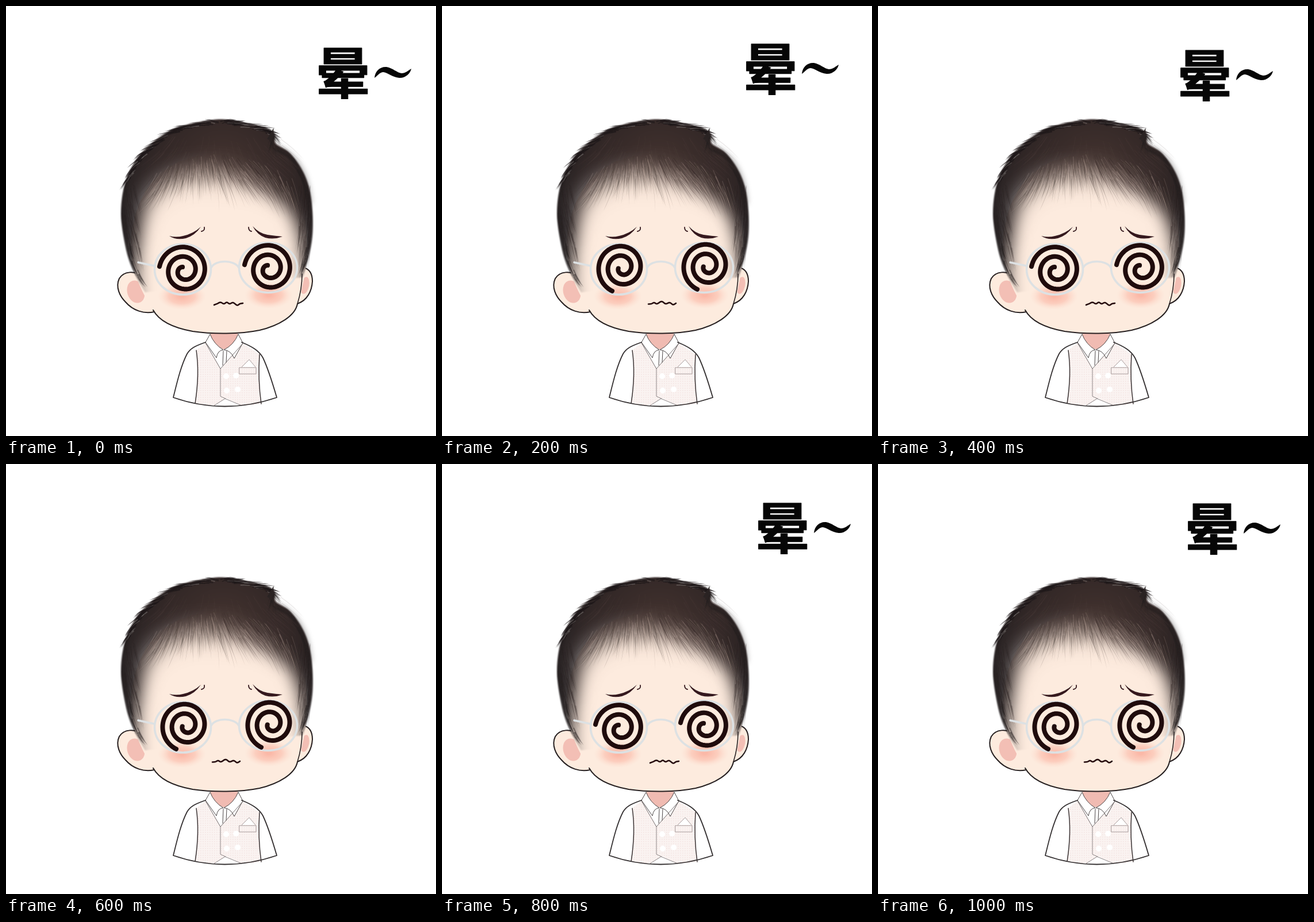
Write an HTML page with a canvas that moves like this. It is 748 by 748 pixels and loops after 1200 ms.

```html
<!DOCTYPE html>
<html lang="zh">
<head>
<meta charset="utf-8">
<title>晕~</title>
<style>
html, body { margin: 0; width: 100%; height: 100%; overflow: hidden; background: #fff; }
canvas { display: block; }
</style>
</head>
<body>
<canvas id="stage" width="748" height="748"></canvas>
<script>
const SIZE = 748, STEP = 200, INK = '#262021', SKIN = '#fdebde';
const ctx = document.getElementById('stage').getContext('2d');

let seed = 11;
const rnd = () => (seed = (seed * 16807) % 2147483647) / 2147483647;
const range = (a, b) => a + (b - a) * rnd();
const mix = (a, b, t) => a + (b - a) * Math.max(0, Math.min(1, t));

function layer() {
  const c = document.createElement('canvas');
  c.width = c.height = SIZE;
  return c.getContext('2d');
}

function fill(g, d, color) {
  g.fillStyle = color;
  g.fill(new Path2D(d));
}

function line(g, d, color, width) {
  g.strokeStyle = color;
  g.lineWidth = width;
  g.lineCap = g.lineJoin = 'round';
  g.stroke(new Path2D(d));
}

function oval(g, x, y, rx, ry, color, tilt = 0) {
  g.fillStyle = color;
  g.beginPath();
  g.ellipse(x, y, rx, ry, tilt, 0, 7);
  g.fill();
}

// Catmull-Rom curve sampled into [x, y] pairs
function spline(p, n = 14) {
  const out = [];
  for (let i = 0; i < p.length - 1; i++) {
    const a = p[Math.max(0, i - 1)], b = p[i], c = p[i + 1], d = p[Math.min(p.length - 1, i + 2)];
    for (let k = 0; k < n; k++) {
      const t = k / n;
      out.push([0, 1].map(j => b[j] + 0.5 * t * (c[j] - a[j] +
        t * (2 * a[j] - 5 * b[j] + 4 * c[j] - d[j] + t * (3 * (b[j] - c[j]) + d[j] - a[j])))));
    }
  }
  out.push(p[p.length - 1]);
  return out;
}

const toPath = pts => 'M' + pts.map(p => p.join(' ')).join('L');

// One tapered hair
function strand(g, x, y, angle, len, bend, width, color) {
  const mx = x + Math.cos(angle) * len / 2, my = y + Math.sin(angle) * len / 2;
  const ex = mx + Math.cos(angle + bend) * len / 2, ey = my + Math.sin(angle + bend) * len / 2;
  const nx = -Math.sin(angle) * width / 2, ny = Math.cos(angle) * width / 2;
  g.fillStyle = color;
  g.beginPath();
  g.moveTo(x - nx, y - ny);
  g.quadraticCurveTo(mx - nx, my - ny, ex, ey);
  g.quadraticCurveTo(mx + nx, my + ny, x + nx, y + ny);
  g.fill();
}

function drawBody(g) {
  const torso = 'M347 585C330 591 321 595 315 605C304 626 297 657 291 681Q380 712 471 681' +
    'C464 657 456 631 447 612C440 599 427 592 410 585';
  fill(g, torso + 'L378 600Z', '#fff');

  const vest = new Path2D('M331 599L347 586L373 631L412 587L441 606Q438 650 444 692Q386 700 329 691Q336 645 331 599Z');
  g.save();
  g.clip(vest);
  g.fillStyle = '#faf3f1';
  g.fillRect(280, 570, 200, 140);
  g.fillStyle = '#f4e5e3';
  for (let y = 584; y < 700; y += 4)
    for (let x = 326; x < 448; x += 4) g.fillRect(x, y, 1.6, 1.6);
  g.restore();

  fill(g, 'M362 695L382 682L411 695Z', '#fff');
  line(g, 'M362 695L381 683L410 695M373 631L373 679L382 683', '#8d8586', 1);
  for (const [x, y] of [[383, 644], [400, 643], [384, 669], [403, 667]]) oval(g, x, y, 5, 5, '#fff');
  fill(g, 'M410 628L423 615L434 628Z', '#fff');
  line(g, 'M410 628L423 615L434 628M406 629H435V640H406Z', '#a79b9b', 1);

  fill(g, 'M356 560H403V582Q394 597 379 597Q364 595 356 582Z', '#f0bbb2');
  fill(g, 'M368 604Q370 597 379 597Q387 597 389 604L385 618L373 631L368 616Z', '#fff');
  fill(g, 'M355 571L347 585L366 612Q368 599 378 598Q362 589 355 571Z', '#fff');
  fill(g, 'M404 571L412 586L397 613Q391 599 379 598Q396 590 404 571Z', '#fff');
  line(g, 'M355 571L347 585L366 612Q368 599 378 598Q362 589 355 571M404 571L412 586L397 613' +
    'Q391 599 379 598Q396 590 404 571M378 600L377 625M384 600L383 620', '#4b4546', 1);
  line(g, 'M347 586L373 631L412 587', '#746c6d', 1);
  line(g, 'M331 599Q337 640 329 691M441 606Q438 650 444 692', '#3b3435', 1.5);
  line(g, torso, '#343031', 1.8);
}

function drawFace(g) {
  const leftEar = 'M236 470C224 460 205 461 197 474C190 489 198 505 208 515C221 530 240 536 258 532';
  const rightEar = 'M517 455C527 457 533 465 533 479C532 496 524 512 507 518';
  fill(g, leftEar + 'L275 490Z', SKIN);
  fill(g, rightEar + 'L495 480Z', SKIN);
  oval(g, 226, 497, 15, 20, '#f3bfb5', -0.3);
  oval(g, 520, 486, 7, 15, '#f3bfb5', 0.2);
  line(g, leftEar, INK, 2);
  line(g, rightEar, INK, 2);

  const chin = 'M256 529C268 551 297 561 325 566C360 571 407 571 441 564C475 556 503 539 507 518';
  fill(g, chin + 'C517 490 522 460 524 420C524 310 480 262 378 255C270 258 222 320 216 420C219 460 234 495 256 529Z', SKIN);
  line(g, chin, INK, 2);
  line(g, 'M507 518C512 502 515 484 515 466', INK, 1.6);

  for (const [x, y] of [[306, 505], [457, 503]]) {
    g.save();
    g.translate(x, y);
    g.scale(1, 0.56);
    const glow = g.createRadialGradient(0, 0, 4, 0, 0, 42);
    glow.addColorStop(0, 'rgba(250,172,154,.8)');
    glow.addColorStop(0.5, 'rgba(251,182,164,.55)');
    glow.addColorStop(1, 'rgba(253,215,200,0)');
    oval(g, 0, 0, 42, 42, glow);
    g.restore();
  }

  const brow = '#35191e';
  fill(g, 'M284 400Q296 403 308 400Q326 396 339 384Q329 399 313 404Q296 408 284 400Z', brow);
  fill(g, 'M429 383Q441 396 455 398Q469 400 481 401Q466 407 451 403Q437 398 429 383Z', brow);
  line(g, 'M345 385Q346 391 340 392M422 385Q422 391 427 392', brow, 1.8);
}

function drawHair(g) {
  const edge = spline([[242, 498], [219, 456], [207, 415], [200, 360], [207, 308], [226, 268], [252, 240],
    [287, 216], [325, 204], [373, 197], [415, 203], [448, 211], [467, 222], [469, 239], [493, 255],
    [514, 283], [527, 315], [533, 355], [533, 400], [526, 440], [516, 472]]);
  const h = layer();

  h.filter = 'blur(4px)';
  fill(h, 'M470 240C510 256 530 293 533 345L510 340Z', 'rgba(70,66,66,.35)');
  h.filter = 'blur(1.2px)';
  const tone = h.createRadialGradient(380, 280, 30, 375, 320, 185);
  tone.addColorStop(0, '#3f302d');
  tone.addColorStop(0.55, '#332827');
  tone.addColorStop(1, '#252021');
  fill(h, toPath(edge) + 'Z', tone);

  // Soft hairline
  h.globalCompositeOperation = 'destination-out';
  h.filter = 'blur(15px)';
  fill(h, 'M232 550C224 490 222 430 242 380C262 338 300 322 345 320C410 320 462 333 490 354' +
    'C512 382 523 430 520 550Z', '#000');
  h.filter = 'blur(20px)';
  oval(h, 358, 364, 116, 74, 'rgba(0,0,0,.9)', 0.1);
  h.filter = 'none';
  h.globalCompositeOperation = 'source-over';

  // Strands falling over the forehead
  for (let i = 0; i < 420; i++) {
    const x = range(255, 500), u = (x - 370) / 130;
    const y = 278 + 42 * u * u + range(-20, 22);
    const deg = x < 330 ? mix(128, 88, (x - 250) / 80) : x < 420 ? mix(88, 46, (x - 330) / 90) : mix(46, 72, (x - 420) / 90);
    const light = rnd() < 0.3;
    strand(h, x, y, (deg + range(-6, 6)) * Math.PI / 180, x < 350 ? range(25, 50) : range(32, 66), range(0, 0.3),
      range(0.6, 1.5), light ? 'rgba(253,228,214,.14)' : 'rgba(50,38,37,.2)');
  }
  // Sides
  for (let i = 0; i < 130; i++) {
    const left = i % 2, y = range(310, 430);
    const x = left ? range(206, 226) + Math.max(0, y - 390) * 0.3 : range(510, 530);
    strand(h, x, y, left ? range(1.35, 1.5) : range(1.57, 1.7), range(28, 52), left ? -0.15 : 0.1,
      range(0.7, 1.6), 'rgba(35,28,28,.22)');
  }
  // Sheen on the crown
  for (let i = 0; i < 110; i++) {
    const x = range(265, 480), y = range(225, 285);
    strand(h, x, y, mix(2.4, 0.6, (x - 265) / 200), range(30, 60), 0.25, range(0.8, 1.6), 'rgba(95,76,70,.14)');
  }
  // Fuzzy contour
  for (let i = 0; i < 480; i++) {
    const k = 8 + Math.floor(rnd() * (edge.length - 18));
    const [x, y] = edge[k], [x2, y2] = edge[k + 1];
    const a = Math.atan2(y2 - y, x2 - x);
    const rising = x < 372, top = y < 300 && x < 460;
    const tilt = top ? range(0.1, 0.45) : range(0, 0.1);
    const inset = range(2, 9);
    const pale = top && rnd() < 0.2;
    strand(h, x - Math.sin(a) * inset, y + Math.cos(a) * inset, rising ? a + Math.PI + tilt : a - tilt,
      range(16, 30), rising ? -0.25 : 0.25, range(0.8, 2.2),
      pale ? 'rgba(190,184,182,.3)' : top ? 'rgba(30,25,26,.65)' : 'rgba(40,34,35,.35)');
  }
  for (const [x, y, a] of [[456, 232, -1], [460, 236, -1.2]]) strand(h, x, y, a, 23, -0.25, 4, '#2a2323');

  g.drawImage(h.canvas, 0, 0);
}

function drawGlasses(g) {
  g.strokeStyle = '#dde1e3';
  g.lineWidth = 3.6;
  for (const [x, y, rx, ry] of [[307.5, 458, 49, 44], [456, 455, 50.5, 43.5]]) {
    g.beginPath();
    g.ellipse(x, y, rx, ry, 0, 0, 7);
    g.stroke();
  }
  line(g, 'M357 455C364 441 397 441 405 455M230 446L258 452', '#dde1e3', 3.6);
}

const still = (() => {
  const g = layer();
  g.fillStyle = '#fff';
  g.fillRect(0, 0, SIZE, SIZE);
  drawBody(g);
  drawFace(g);
  drawHair(g);
  drawGlasses(g);
  return g.canvas;
})();

function spiral(cx, cy, start) {
  ctx.strokeStyle = '#1f0b0c';
  ctx.lineWidth = 8;
  ctx.lineCap = ctx.lineJoin = 'round';
  ctx.beginPath();
  for (let q = 0; q <= 8.6; q += 0.05) {
    const a = start + q * Math.PI / 2;
    const r = 43.5 - 4.05 * q - Math.max(0, q - 7.5) * 2;
    ctx.lineTo(cx + r * Math.cos(a), cy + r * 1.02 * Math.sin(a));
  }
  ctx.stroke();
}

const poses = [
  { eye: [310, 460], turn: 189, mouth: [[362, 520], [367, 518], [373, 515.5], [379, 518], [384, 515.5], [389, 518], [395, 516], [402, 520.5], [407, 518], [412, 517]] },
  { eye: [313, 455], turn: 113, mouth: [[359, 518.5], [364, 518], [369, 516], [374, 518], [382, 514], [389, 518], [396, 516], [402, 519.5], [407, 517]] }
];

const shake = [[0, 0], [-15, -7], [-18, 4], null, [6, -5], [-5, -4]];

function drawWord(dx, dy) {
  ctx.save();
  ctx.translate(dx, dy);
  ctx.font = '900 96px "Noto Sans CJK SC", "Noto Sans CJK JP", "Noto Sans CJK", sans-serif';
  ctx.textAlign = 'center';
  ctx.fillStyle = ctx.strokeStyle = '#060606';
  ctx.lineWidth = 1.2;
  ctx.lineJoin = 'round';
  ctx.fillText('晕', 586, 152);
  ctx.strokeText('晕', 586, 152);
  fill(ctx, 'M641 125C642 113 651 105 662 106C673 108 680 116 688 117C695 117 700 112 705 109' +
    'C704 117 694 126 684 125C672 124 663 115 656 115C649 116 646 122 641 125Z', '#060606');
  ctx.restore();
}

function draw(now) {
  const step = Math.floor(now / STEP) % shake.length;
  const { eye: [x, y], turn, mouth } = poses[step % 2];
  const start = turn * Math.PI / 180;
  ctx.drawImage(still, 0, 0);
  spiral(x, y, start);
  spiral(x + 148, y - 3, start);
  line(ctx, toPath(spline(mouth, 6)), '#260d0f', 2.6);
  if (shake[step]) drawWord(...shake[step]);
}

const begin = performance.now();
function tick() {
  draw(performance.now() - begin);
  requestAnimationFrame(tick);
}
tick();
</script>
</body>
</html>
```
